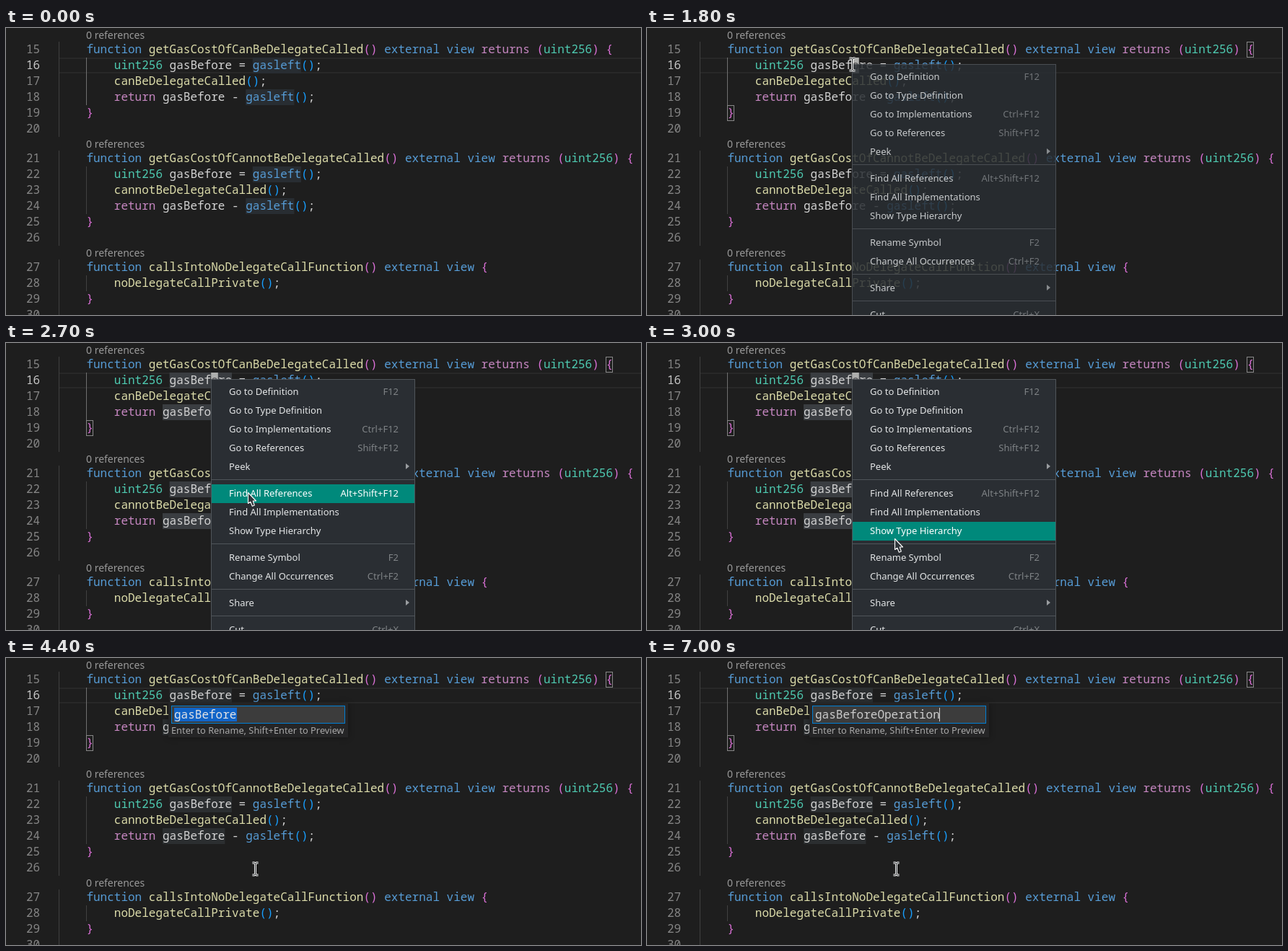
Recreate the animation shown at these times as an HTML page with a canvas. Size 880x398 px, loop 8000 ms.

```html
<!DOCTYPE html>
<html lang="en">
<head>
<meta charset="utf-8">
<title>Rename symbol</title>
<style>
html, body { margin: 0; width: 100%; height: 100%; overflow: hidden; background: #1e1e1e; }
canvas { display: block; }
</style>
</head>
<body>
<canvas id="stage" width="880" height="398"></canvas>
<script>
const ctx = document.getElementById('stage').getContext('2d');
const LOOP = 8000, LEFT = 73, CHAR = 9.6, LINE = 22, ASCENT = 16;
const MONO = '16px "Noto Sans Mono", monospace';
const sans = size => size + 'px "Noto Sans", sans-serif';

// Blocks of code: top of the first line, its number and the lines
const blocks = [
  [19, 15, [
    '    function getGasCostOfCanBeDelegateCalled() external view returns (uint256) {',
    '        uint256 gasBefore = gasleft();',
    '        canBeDelegateCalled();',
    '        return gasBefore - gasleft();',
    '    }', '']],
  [170, 21, [
    '    function getGasCostOfCannotBeDelegateCalled() external view returns (uint256) {',
    '        uint256 gasBefore = gasleft();',
    '        cannotBeDelegateCalled();',
    '        return gasBefore - gasleft();',
    '    }', '']],
  [321, 27, [
    '    function callsIntoNoDelegateCallFunction() external view {',
    '        noDelegateCallPrivate();',
    '    }', '']]
];
const colors = {
  function: '#569cd6', external: '#569cd6', view: '#569cd6', gasleft: '#569cd6',
  uint256: '#4ec9b0', return: '#c586c0', returns: '#c586c0', gasBefore: '#d4d4d4'
};

// Menu entries: top of the row, label, shortcut ('>' opens a submenu)
const menu = [
  [55, 'Go to Definition', 'F12'],
  [81, 'Go to Type Definition', ''],
  [107, 'Go to Implementations', 'Ctrl+F12'],
  [133, 'Go to References', 'Shift+F12'],
  [159, 'Peek', '>'],
  [196, 'Find All References', 'Alt+Shift+F12'],
  [222, 'Find All Implementations', ''],
  [248, 'Show Type Hierarchy', ''],
  [285, 'Rename Symbol', 'F2'],
  [311, 'Change All Occurrences', 'Ctrl+F2'],
  [348, 'Share', '>'],
  [385, 'Cut', 'Ctrl+X']
];
const keyTimes = [5500, 5700, 5900, 6200, 6400, 6600, 6700, 6900, 7000];

function rect(color, x, y, w, h) {
  ctx.fillStyle = color;
  ctx.fillRect(x, y, w, h);
}

function frame(color, x, y, w, h) {
  ctx.strokeStyle = color;
  ctx.lineWidth = 1;
  ctx.strokeRect(x + .5, y + .5, w - 1, h - 1);
}

function text(str, x, y, color, font = MONO, align = 'left') {
  ctx.font = font;
  ctx.textAlign = align;
  ctx.fillStyle = color;
  ctx.fillText(str, x, y);
}

function tokenColor(token, nested) {
  if (/[(){}]/.test(token)) return nested ? '#179fff' : '#da70d6';
  return colors[token] || (/\w/.test(token) ? '#dcdcaa' : '#d4d4d4');
}

function highlight(token, t) {
  if (token === 'gasleft' && t < 1600) return '#282d32';
  if (token === 'gasBefore' && t >= 1900) return t < 4200 ? '#3a3d41' : '#2b2e30';
}

function drawLine(line, number, y, t) {
  const active = number === 16, nested = line.startsWith('        ');
  if (active) {
    rect('#282828', LEFT, y, 880, 2);
    rect('#282828', LEFT, y + LINE - 2, 880, 2);
  }
  rect('#404040', LEFT, y, 1, LINE);
  if (nested) rect(number < 20 ? '#707070' : '#404040', 111, y, 1, LINE);
  text(number, 47.2, y + ASCENT, active ? '#c6c6c6' : '#858585', MONO, 'right');
  for (const { 0: token, index } of line.matchAll(/\w+|\S/g)) {
    const x = LEFT + index * CHAR, mark = highlight(token, t);
    if (mark) rect(mark, x, y, token.length * CHAR, LINE);
    text(token, x, y + ASCENT, tokenColor(token, nested));
  }
}

function drawCode(t) {
  for (const [top, first, lines] of blocks) {
    text('0 references', 111, top - 4, '#999999', sans(14));
    lines.forEach((line, i) => drawLine(line, first + i, top + i * LINE, t));
  }
  if (t >= 1600) {
    frame('#888888', 831, 19, 10, LINE);
    frame('#888888', 111, 107, 10, LINE);
  }
  const blinkOn = Math.floor((t - 1600) / 550) % 2 === 0;
  if (t >= 1600 && t < 4200 && blinkOn) {
    const x = LEFT + 22 * CHAR;
    rect('#aeafad', x, 41, CHAR, LINE);
    text('o', x, 41 + ASCENT, '#515052');
  }
}

function menuAlpha(t) {
  if (t < 1700 || t >= 4200) return 0;
  if (t < 1900) return t < 1800 ? .45 : .85;
  return t < 4000 ? 1 : t < 4100 ? .7 : .25;
}

function drawMenu(t, pointer) {
  ctx.globalAlpha = menuAlpha(t);
  if (!ctx.globalAlpha) { ctx.globalAlpha = 1; return; }
  rect('#2a2e33', 284, 50, 283, 360);
  frame('#50555a', 284, 50, 283, 360);
  for (const y of [189, 278, 341, 378]) rect('#50555a', 285, y, 281, 1);
  for (const [y, label, key] of menu) {
    const hot = pointer.arrow && pointer.y >= y && pointer.y < y + 26;
    if (hot) rect('#00897b', 285, y, 281, 26);
    text(label, 309, y + 17, hot ? '#ffffff' : '#e4e6e7', sans(13));
    if (key === '>') {
      ctx.fillStyle = '#9a9da0';
      ctx.fill(new Path2D(`M554 ${y + 8}l5 4l-5 4z`));
    } else {
      text(key, 544, y + 17, hot ? '#ffffff' : '#7f8386', sans(13), 'right');
    }
  }
  ctx.globalAlpha = 1;
}

function drawRename(t) {
  if (t < 4300) return;
  ctx.shadowColor = 'rgba(0,0,0,.36)';
  ctx.shadowBlur = 8;
  rect('#252526', 225, 63, 249, 47);
  ctx.shadowBlur = 0;
  ctx.shadowColor = 'transparent';
  rect('#3c3c3c', 229, 66, 241, 25);
  frame('#007fd4', 229, 66, 241, 25);
  const typed = keyTimes.filter(k => k <= t).length;
  const value = 'gasBefore' + 'Operation'.slice(0, typed);
  const selected = t < 5100;
  if (selected) rect('#1064c8', 233, 69, 87, 19);
  text(value, 233, 84, selected ? '#e4e4e4' : '#cccccc');
  if (!selected) rect('#cccccc', Math.floor(233 + value.length * CHAR), 69, 1, 19);
  text('Enter to Rename, Shift+Enter to Preview', 229, 105, '#a9a9a9', sans(12.8));
}

// Where the mouse is: moves between two points, slowing down when ease is 2
function glide(t, start, end, ease, x0, y0, x1, y1) {
  const p = Math.min(1, Math.max(0, (t - start) / (end - start)));
  const e = 1 - (1 - p) ** ease;
  return { x: x0 + (x1 - x0) * e, y: y0 + (y1 - y0) * e };
}

function pointerAt(t) {
  if (t < 2100) return glide(t, 500, 1100, 2, 314, 3, 285, 51);
  if (t >= 4200) return { x: 346, y: 293 };
  const pos = t < 2700
    ? glide(t, 2100, 2400, 1, 287, 57, 320, 111)
    : glide(t, 2700, 3300, 2, 335, 207, 345, 292);
  return { ...pos, arrow: true };
}

const beam = new Path2D('M-4 -8.5H-1.5L0 -7.5L1.5 -8.5H4M0 -7.5V7.5M-4 8.5H-1.5L0 7.5L1.5 8.5H4');
const arrow = new Path2D('M.5 .5V15.5L3.8 13.2L6.3 19.3L9.3 18L7.3 12H11.5Z');

function drawPointer(t, { x, y, arrow: isArrow }) {
  if (t < 500) return;
  ctx.save();
  ctx.lineJoin = 'round';
  ctx.strokeStyle = '#ffffff';
  if (isArrow) {
    ctx.translate(Math.round(x), Math.round(y));
    ctx.fillStyle = '#31363b';
    ctx.fill(arrow);
    ctx.lineWidth = 1.1;
    ctx.stroke(arrow);
  } else {
    ctx.translate(Math.round(x) - .5, Math.round(y) - .5);
    ctx.lineWidth = 3;
    ctx.stroke(beam);
    ctx.strokeStyle = '#1b1e20';
    ctx.lineWidth = 1;
    ctx.stroke(beam);
  }
  ctx.restore();
}

function draw(now) {
  const t = Math.floor(now % LOOP / 100) * 100;
  const pointer = pointerAt(t);
  rect('#1e1e1e', 0, 0, 880, 398);
  drawCode(t);
  drawMenu(t, pointer);
  drawRename(t);
  drawPointer(t, pointer);
}

const begin = performance.now();
function tick() {
  draw(performance.now() - begin);
  requestAnimationFrame(tick);
}
tick();
</script>
</body>
</html>
```
